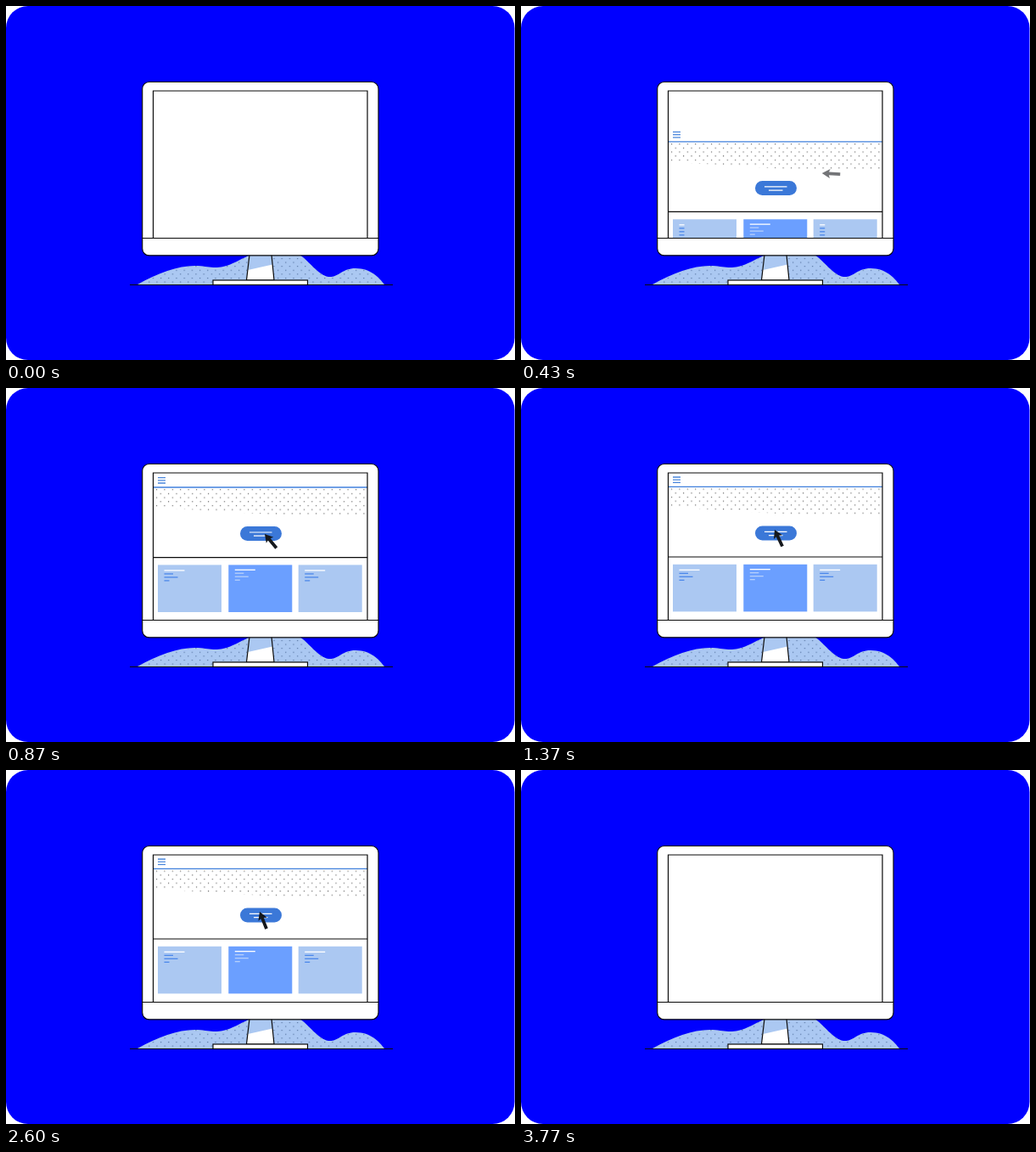
Recreate the animation shown at these times as an HTML page. Size 600 by 417 pixels, loop 4630 ms.

```html
<!DOCTYPE html>
<html lang="en">
<head>
<meta charset="utf-8">
<title>Page loading on a monitor</title>
<style>
  html, body { margin: 0; width: 100%; height: 100%; overflow: hidden; background: #fff; }
  svg { display: block; width: 600px; height: 417px; }
  .ink { stroke: #0a0a0a; stroke-width: 1.2; }
</style>
</head>
<body>
<svg viewBox="0 0 600 417">
  <defs>
    <pattern id="dots" x="176" y="118.5" width="9.4" height="9.4" patternUnits="userSpaceOnUse">
      <path d="M1 .7h1.1M5.7 5.4h1.1" stroke="#333" stroke-width="1.1"/>
    </pattern>
    <pattern id="specks" x="158" y="296" width="9.2" height="9.2" patternUnits="userSpaceOnUse">
      <path d="M1 1.5h1.2M5.6 6.1h1.2" stroke="#54719f" stroke-width="1.2"/>
    </pattern>
    <clipPath id="screen"><rect x="174" y="100.5" width="252" height="172.5"/></clipPath>
    <clipPath id="pill"><rect x="276" y="162.5" width="49" height="17" rx="8.5"/></clipPath>
    <path id="hill" d="M155 328C180 314 205 305 226 306C240 307 246 310 260 306C272 302 278 297 289 293H346C357 300 368 317 380 319C392 320 396 309 412 309C430 309 440 320 446 328Z"/>
  </defs>

  <rect width="599.5" height="417" rx="26" fill="#00f"/>

  <use href="#hill" fill="#abc8f2"/>
  <use href="#hill" fill="url(#specks)"/>
  <path d="M287 293H313L316 323H283.5Z" fill="#fff"/>
  <path d="M287 293H313L314.2 304.5L285.2 311Z" fill="#abc8f2"/>
  <path class="ink" d="M287 293L283.5 323H316L313 293" fill="none"/>
  <path class="ink" d="M146 328.5H456"/>
  <rect class="ink" x="244" y="323" width="111.5" height="5.5" fill="#fff"/>

  <rect class="ink" x="160.7" y="89.5" width="278.3" height="204.3" rx="8" fill="#fff"/>

  <g clip-path="url(#screen)">
    <g id="page">
      <path d="M179 105h9m-9 3.2h9m-9 3.2h9" stroke="#4a86dc" stroke-width="1.3"/>
      <path d="M174 117H426V150L320 149L174 140Z" fill="url(#dots)"/>
      <path d="M173 116.4H426" stroke="#4080dc" stroke-width="1.4"/>
      <path class="ink" d="M173 199H426"/>
      <g clip-path="url(#pill)">
        <rect x="276" y="162" width="49" height="18" fill="#3b78d8"/>
        <g id="press">
          <rect x="276" y="162" width="49" height="18" fill="#2a4a80"/>
          <rect x="276" y="165" width="49" height="17" rx="8.5" fill="#6b9fff"/>
        </g>
      </g>
      <path id="label" d="M287 169.4h26.5m-21.5 4.2h16.5" stroke="#fff" stroke-width="1.2"/>
      <g id="cards"></g>
    </g>
  </g>

  <path class="ink" d="M173.5 273.5V100H426V273.5M161 273.5H439" fill="none"/>
  <path id="cursor" d="M0 0L9.5 -5.5L8.2 -1.9L21.5 -1.9V1.9L8.2 1.9L9.5 5.5Z" fill="#15181c"/>
</svg>

<script>
const LOOP = 4630;
const $ = id => document.getElementById(id);
const set = (el, attrs) => { for (const k in attrs) el.setAttribute(k, attrs[k]); };
const span = (t, a, b) => Math.min(1, Math.max(0, (t - a) / (b - a)));
const easeInOut = p => p < .5 ? 4 * p ** 3 : 1 - 4 * (1 - p) ** 3;

function add(attrs) {
  const el = document.createElementNS('http://www.w3.org/2000/svg', 'rect');
  set(el, attrs);
  $('cards').append(el);
  return el;
}

const LINE_WIDTHS = [24, 10.5, 16, 6];
const growing = [];
[179, 262.3, 344.7].forEach((x, i) => {
  const middle = i === 1;
  add({ x, y: 207.8, width: 75, height: 55.6, fill: middle ? '#6b9fff' : '#abc8f2' });
  LINE_WIDTHS.forEach((width, row) => {
    const fill = row === 0 ? '#fff' : middle ? '#b5cffb' : '#4c88ea';
    const y = (middle ? 213 : 213.7) + row * 4;
    const el = add({ x: x + 7.5, y, width, height: 1.3, fill });
    if (!middle) growing.push({ el, width });
  });
});

// Cursor arrival: time, x, y, angle, opacity
const ENTRY = [
  [200, 420, 190, -10, 0],
  [430, 355, 197, 3, .6],
  [670, 318, 186, 24, .85],
  [870, 305, 172, 50, 1],
  [1230, 299, 167, 65, 1]
];

// Smooth curve through the key poses, at rest at the last one
function entryPose(t) {
  const last = ENTRY.length - 1;
  if (t <= ENTRY[0][0]) return ENTRY[0];
  if (t >= ENTRY[last][0]) return ENTRY[last];
  const i = ENTRY.findIndex(k => k[0] > t) - 1;
  const a = ENTRY[i], b = ENTRY[i + 1], h = b[0] - a[0], p = (t - a[0]) / h;
  const slope = (n, c) => {
    if (n === last) return 0;
    const u = ENTRY[Math.max(0, n - 1)], v = ENTRY[n + 1];
    return (v[c] - u[c]) / (v[0] - u[0]);
  };
  return a.map((from, c) =>
    from * (1 + 2 * p) * (1 - p) ** 2 + b[c] * p * p * (3 - 2 * p) +
    h * (slope(i, c) * p * (1 - p) ** 2 - slope(i + 1, c) * p * p * (1 - p)));
}

function draw(t) {
  const rise = 186 * (1 - span(t, 70, 1010)) ** 3;
  const fade = 1 - span(t, 2600, 3200) ** 2;
  set($('page'), { transform: `translate(0 ${rise})`, opacity: fade });

  const grow = span(t, 430, 650);
  for (const { el, width } of growing) set(el, { width: 6 + (width - 6) * grow });

  const press = Math.sin(Math.PI * span(t, 1600, 2100));
  set($('press'), { opacity: press });
  set($('label'), { transform: `translate(0 ${press * 2})`, opacity: 1 - press * .3 });

  const [, x, y, angle, alpha] = entryPose(t);
  const exit = easeInOut(span(t, 2600, 3630));
  set($('cursor'), {
    transform: `translate(${x + 142 * exit} ${y - 52 * exit}) rotate(${angle + 3 * span(t, 2070, 2230)})`,
    opacity: Math.min(1, alpha) * (1 - span(t, 3150, 3630))
  });
}

function tick() {
  draw(performance.now() % LOOP);
  requestAnimationFrame(tick);
}
tick();
</script>
</body>
</html>
```
